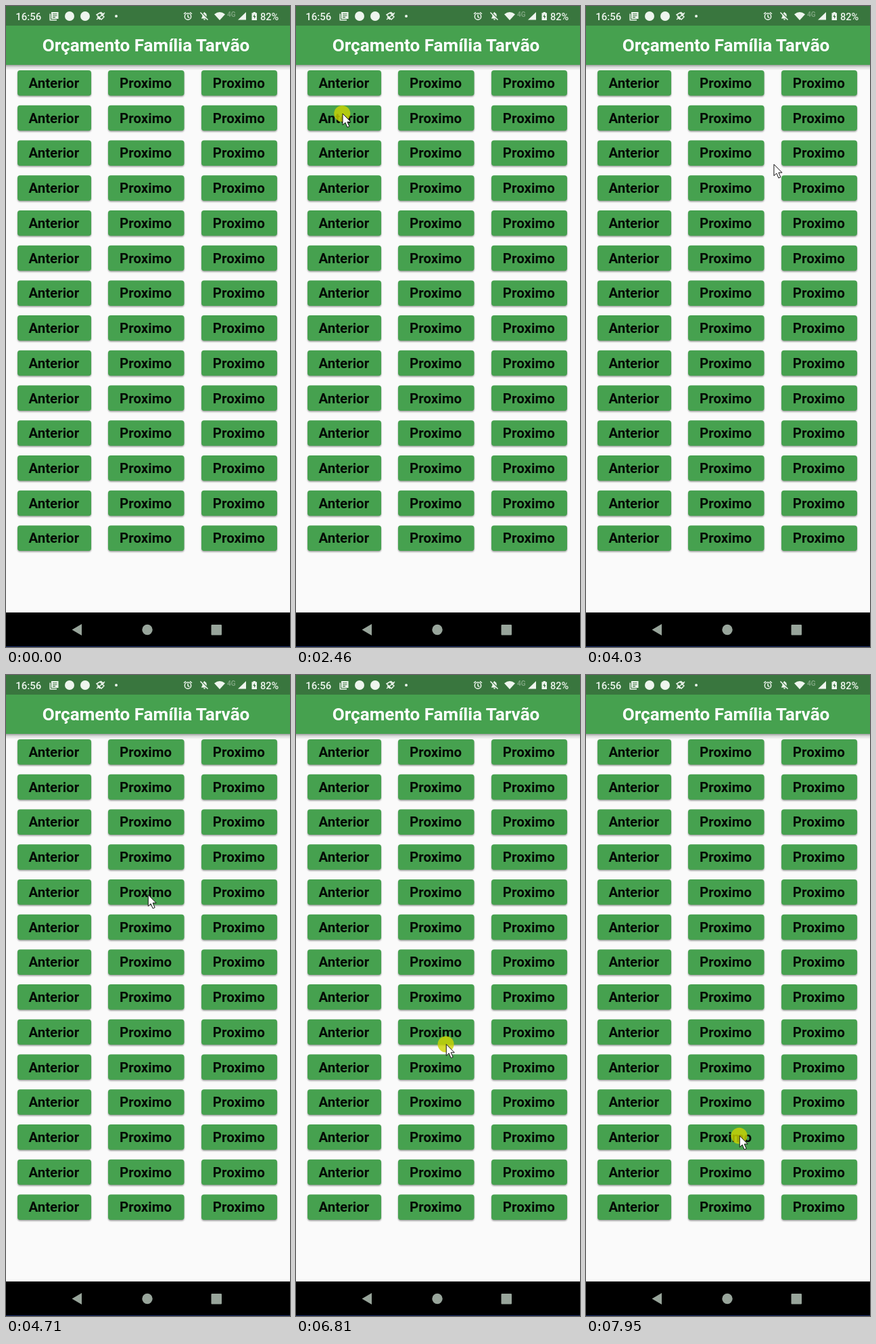
Recreate the animation shown at these times as an HTML page. Size 420 by 947 pixels, loop 8 s.

```html
<!DOCTYPE html>
<html lang="pt">
<head>
<meta charset="utf-8">
<title>Orçamento</title>
<style>
  html, body { margin: 0; width: 100%; height: 100%; overflow: hidden; background: #fafafa; }
  svg { display: block; width: 100%; height: 100%; }
  text { font-family: Roboto, "Open Sans", sans-serif; font-weight: 700; }
  .status text { font-weight: 500; fill: #eef5ee; }
</style>
</head>
<body>
<svg id="stage" viewBox="0 0 420 947">
  <defs>
    <linearGradient id="fade" x2="0" y2="1">
      <stop offset="0" stop-color="#000" stop-opacity=".36"/>
      <stop offset=".4" stop-color="#000" stop-opacity=".13"/>
      <stop offset="1" stop-color="#000" stop-opacity="0"/>
    </linearGradient>
    <filter id="soft" x="-10%" y="-30%" width="120%" height="170%"><feGaussianBlur stdDeviation="1.3"/></filter>
    <filter id="wide" x="-15%" y="-40%" width="130%" height="200%"><feGaussianBlur stdDeviation="3"/></filter>
  </defs>
  <rect width="420" height="947" fill="#fafafa"/>
  <rect y="87" width="420" height="8" fill="url(#fade)"/>
  <rect width="420" height="87" fill="#46a14f"/>
  <rect width="420" height="29" fill="#39763e"/>
  <text x="53.8" y="67.200" font-size="26.100">Orçamento Família Tarvão</text>

  <g class="status" fill="#eef5ee">
    <text x="14.300" y="20.700" font-size="15">16:56</text>
    <path d="M67 9h10.500v10H67zM64.500 11.500h1.500v8.500h9v1.500H64.500z"/>
    <path d="M69 11.800h6.500M69 14.200h6.500M69 16.600h4" stroke="#39763e" stroke-width="1.100"/>
    <circle cx="94" cy="15" r="7"/>
    <circle cx="117" cy="15" r="7"/>
    <g fill="none" stroke="#eef5ee" stroke-width="1.500">
      <path d="M134 13l5 -3 6 6 -4 4zM134 20L146 10M135 16l4 4M140 9l5 4"/>
      <circle cx="269" cy="15.500" r="4.700"/>
      <path d="M269 12.500v3.500l2.300 1.300M263 11.800l3 -2.600M275 11.800l-3 -2.600"/>
      <path d="M287.500 9.500l11 11"/>
    </g>
    <circle cx="163" cy="15" r="2"/>
    <path d="M289 18.500v-1l1.300-1.300v-3.400l5.700 5.700zM291.500 11q.5-.7 1.300-.9 0-1.200 .7-1.200t.7 1.200q2.500.6 2.500 3.400v2.500zM292 19.300h3q-.3 1.500-1.500 1.500t-1.500-1.500z"/>
    <path d="M308 12.300q8-6.600 16 0L316 21z"/>
    <text x="327" y="15.700" font-size="10" style="fill:#86aa88">4G</text>
    <path d="M355 9v11.500h-12z"/>
    <path d="M365.500 9h3.500v1.300h2V21h-7.500V10.300h2z"/>
    <path d="M367.800 12l-2.500 4h1.700v3l2.500-4h-1.700z" fill="#39763e"/>
    <text x="376" y="20.700" font-size="14.600">82%</text>
  </g>

  <g id="grid"></g>

  <rect y="896" width="420" height="51" fill="#000"/>
  <rect y="946" width="420" height="1" fill="#1c2f6b"/>
  <g fill="#98a59b">
    <path d="M97.500 921.500L112 913v17z"/>
    <circle cx="209" cy="921.500" r="7.700"/>
    <rect x="303.500" y="914" width="15.500" height="15.500" rx="1"/>
  </g>

  <g id="pointer">
    <circle id="press" cx="-.7" r="12" fill="#cdd400" fill-opacity=".8"/>
    <path d="M0 0V16.800L3.900 13.200L6.900 20.200L9.900 18.900L6.900 12.200H12z" fill="#fff" stroke="#111" stroke-linejoin="round"/>
  </g>
</svg>
<script>
const LOOP = 8000, ENTER = 390, TICK = 69;
const PRESS_TIME = 140, RIPPLE_DELAY = 130, RIPPLE_TIME = 280;
const LEAVE = 150, ARRIVE = 100; // pointer rests this long after and before a press
const COLS = [[17, 109, "Anterior"], [151, 112.5, "Proximo"], [289, 112, "Proximo"]];
const ROWS = 14, TOP = 95, PITCH = 51.73, HEIGHT = 37.5;

const $ = id => document.getElementById(id);
const lerp = (a, b, k) => a + (b - a) * k;
const clamp = k => Math.min(1, Math.max(0, k));
const smooth = k => k * k * (3 - 2 * k);

function set(el, attrs) {
  for (const key in attrs) el.setAttribute(key, attrs[key]);
  return el;
}

function add(parent, tag, attrs) {
  const el = document.createElementNS("http://www.w3.org/2000/svg", tag);
  return parent.appendChild(set(el, attrs));
}

function makeButton([x, width, label], col, row) {
  const y = TOP + row * PITCH, cx = x + width / 2, cy = y + HEIGHT / 2;
  const box = { x, y, width, height: HEIGHT, rx: 4 };
  const id = `clip${col}-${row}`;
  const g = add($("grid"), "g", {});
  add(add(g, "clipPath", { id }), "rect", box);
  const lift = add(g, "rect", { ...box, y: y + 4, opacity: 0, filter: "url(#wide)" });
  add(g, "rect", { ...box, y: y + 1.5, opacity: .38, filter: "url(#soft)" });
  add(g, "rect", { ...box, fill: "#46a14f" });
  const holder = add(g, "g", { "clip-path": `url(#${id})` });
  const ripple = add(holder, "circle", { r: 0, fill: "#fff", opacity: 0 });
  add(g, "text", { x: cx - .7, y: cy + 7.2, "font-size": 20.5, "text-anchor": "middle", fill: "#050b06" })
    .textContent = label;
  return { cx, cy, lift, ripple };
}

const buttons = COLS.map((spec, col) =>
  Array.from({ length: ROWS }, (_, row) => makeButton(spec, col, row)));

// A run of evenly spaced presses; the aim drifts from one offset to another.
function run(start, step, from, to, cells) {
  return cells.map(([col, row], i) => {
    const button = buttons[col][row], k = i / (cells.length - 1);
    return {
      button, time: start + i * step, bend: 1,
      x: button.cx + lerp(from[0], to[0], k),
      y: button.cy + lerp(from[1], to[1], k)
    };
  });
}

const down = (first, count) => Array.from({ length: count }, (_, i) => [1, first + i]);

const clicks = [
  ...run(1450, 452, [8, -9], [-13, -4], [[0, 0], [1, 0], [0, 1], [1, 1], [2, 1]]),
  ...run(4740, 420, [3, 4], [-9, -11], down(4, 4)),
  ...run(6740, 370, [15, 18], [20, -2], down(8, 4))
];
const stops = [{ time: ENTER - LEAVE, x: 376, y: 906, bend: 3 }, ...clicks];

function pointerAt(t) {
  const i = Math.max(0, stops.findLastIndex(s => s.time <= t));
  const a = stops[i], b = stops[i + 1] || a;
  const begin = a.time + LEAVE, end = b.time - ARRIVE;
  const k = b === a ? 0 : smooth(clamp((t - begin) / (end - begin)));
  return { x: lerp(a.x, b.x, k ** a.bend), y: lerp(a.y, b.y, k) };
}

function drawRipple(t, { button, time, x, y }) {
  const p = clamp((t - time - RIPPLE_DELAY) / RIPPLE_TIME);
  const k = clamp(p * 1.5);
  const opacity = .3 * Math.min(1, p * 2.5, (1 - p) * 6);
  set(button.ripple, {
    cx: lerp(x, button.cx, k), cy: lerp(y, button.cy, k), r: 12 + 42 * p, opacity
  });
  set(button.lift, { opacity });
}

function render(now) {
  const t = ENTER + Math.floor((now - ENTER) / TICK) * TICK;
  const { x, y } = pointerAt(t);
  const held = clicks.some(c => t >= c.time && t < c.time + PRESS_TIME);
  set($("pointer"), {
    transform: `translate(${x} ${y})`,
    visibility: t < ENTER ? "hidden" : "visible"
  });
  set($("press"), { opacity: held ? 1 : 0 });
  clicks.forEach(click => drawRipple(t, click));
}

document.querySelector("#stage > text").setAttribute("fill", "#fff");
const begin = performance.now();
function loop() {
  render((performance.now() - begin) % LOOP);
  requestAnimationFrame(loop);
}
loop();
</script>
</body>
</html>
```
